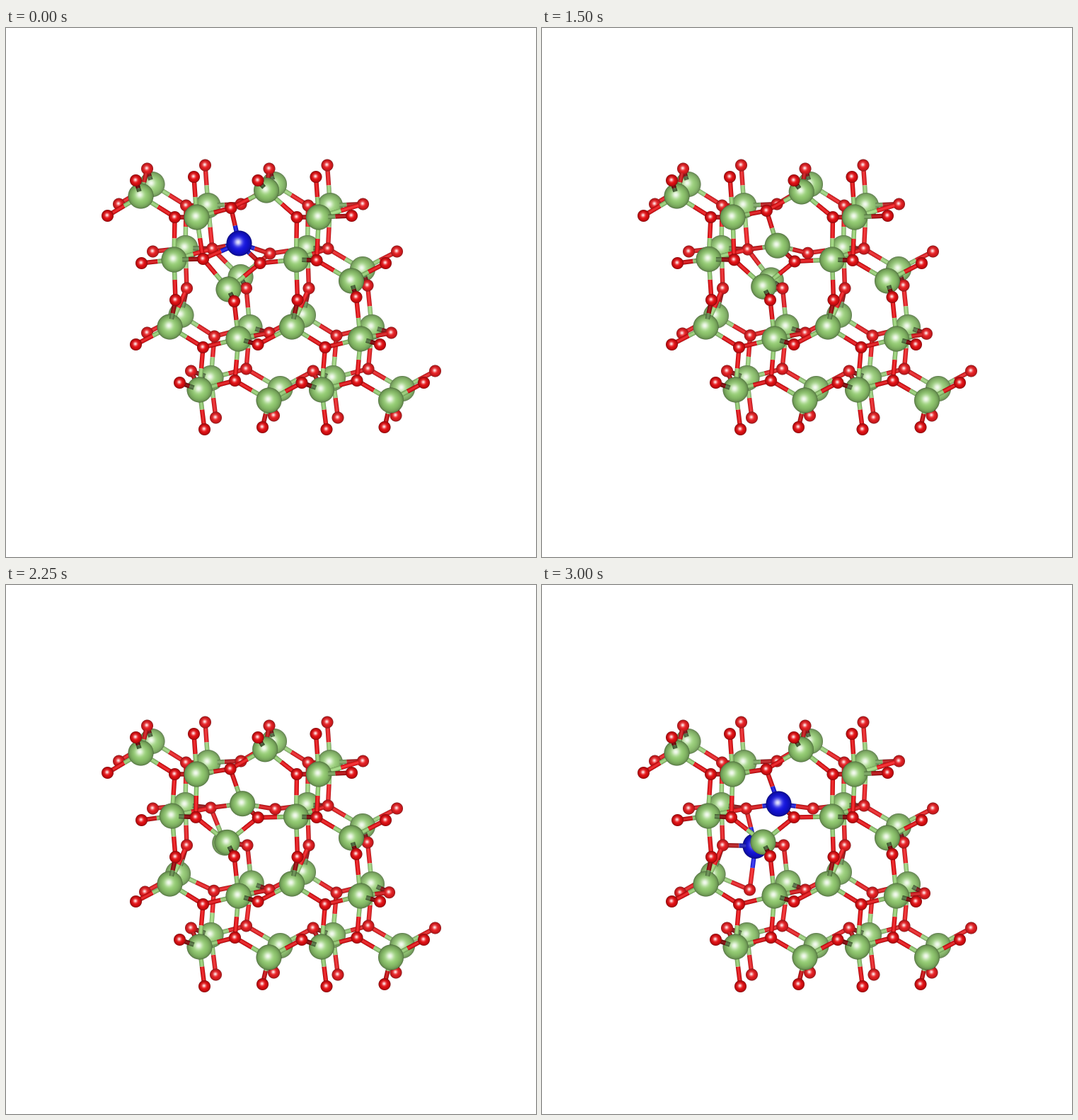
A matplotlib script for the animation above (4000 ms loop, 749 px wide and 748 px high).

```python
import numpy as np
import matplotlib.pyplot as plt
from matplotlib.animation import FuncAnimation

W, H, DPI = 749, 748, 100
STEP_MS, STEPS, LAST = 250, 16, 9     # LAST: index of the final pose
METAL_R, OXY_R, BOND_R = 18, 8.5, 3.2
REACH, CORE_REACH = 63, 58            # longest bond on screen
TILTED = 48                           # shorter ones lean to the viewer

GREEN = np.array([148, 206, 114]) / 255
RED = np.array([232, 14, 18]) / 255
BLUE = np.array([20, 20, 228]) / 255

# Unit cell: repeated along PERIOD, and once more behind by DEPTH.
PERIOD = np.array([172.5, 0])
DEPTH = np.array([16, -16.5])
METALS = dict(A=(190, 237), B=(269, 267), C=(237, 327), D=(315, 357),
              E=(231, 422), F=(328, 439), G=(273, 511), H=(371, 526))
OXYGENS = dict(a=(143, 265), b=(183, 215), c=(265, 210), d=(238, 267),
               e=(191, 332), f=(266, 328), g=(239, 384), h=(322, 380),
               i=(183, 447), j=(278, 451), k=(245, 501), l=(323, 498),
               m=(280, 567), n=(362, 564))
TRIPLE = "aeik"                       # sites that appear three times in a row
TOWARD = "abfghik"                    # oxygens in front of their metal
CORE = "X"

# Displacement around the defect: (start, end).
SHIFT = {CORE: ((0, 0), (5, 5)),
         "D0": ((-1, 12), (-3, 6)), "D0'": ((0, 11), (-30, 28)),
         "f0": ((12, -2), (1, 0)), "f0'": ((9, 0), (6, 4)),
         "e1": ((-5, 0), (-8, -4)), "e1'": ((-7, 3), (3, 0)),
         "A1": ((5, -8), (3, -5)), "a1": ((2, -11), (1, -5)),
         "h0": ((0, 6), (0, 3)), "h0'": ((1, 4), (3, 4)),
         "j0'": ((0, 1), (-1, -4)), "E0'": ((0, 0), (-6, 3)),
         "i0'": ((0, 0), (-4, 4)), "i2'": ((0, 0), (-4, 5)),
         "F0'": ((0, 0), (3, -2)), "C0": ((0, 0), (-3, -1))}

# Bonds that break or form by depth: first and last pose.
SPANS = {("F0'", "j0'"): (0, 7), ("G0'", "j0'"): (0, 7), ("D0'", "g0'"): (LAST, LAST)}


def build():
    rest = {CORE: np.array([329.0, 304.0])}
    for site, p in {**METALS, **OXYGENS}.items():
        for n in range(3 if site in TRIPLE else 2):
            rest[f"{site}{n}"] = p + n * PERIOD
            rest[f"{site}{n}'"] = p + n * PERIOD + DEPTH
    return rest


REST = build()


def is_far(key):
    return key.endswith("'")


def positions(pose):
    t = pose / LAST
    smooth, quick = t * t * (3 - 2 * t), 1 - (1 - t) ** 2.5
    pos = dict(REST)
    for k, (start, end) in SHIFT.items():
        ease = smooth if is_far(k) else quick
        pos[k] = REST[k] + np.array(start) * (1 - ease) + np.array(end) * ease
    return pos


def window(img, lo, hi, pad):
    x0, y0 = np.floor(lo - pad).astype(int)
    x1, y1 = np.ceil(hi + pad).astype(int) + 1
    yy, xx = np.mgrid[y0:y1, x0:x1]
    return img[y0:y1, x0:x1], xx, yy


def blend(view, color, alpha, fog):
    color = np.clip(color, 0, 1) * (1 - fog) + fog
    view += (color - view) * alpha[..., None]


def sphere(img, c, r, color, fog):
    view, xx, yy = window(img, c, c, r + 2)
    u, v = (xx - c[0]) / r, (yy - c[1]) / r
    d = np.hypot(u, v)
    nz = np.sqrt(np.clip(1 - d * d, 0, 1))
    glow = .88 * np.exp(-((u + .08) ** 2 + (v + .1) ** 2) / .1)
    lit = color * (.42 + .6 * nz ** .8)[..., None]
    lit = lit + (1 - lit) * glow[..., None]
    blend(view, lit, np.clip((1 - d) * r + .5, 0, 1), fog)


def rod(img, p, q, color, shade, fog):
    size = np.hypot(*(q - p))
    if size < .5:
        return
    dx, dy = (q - p) / size
    view, xx, yy = window(img, np.minimum(p, q), np.maximum(p, q), BOND_R + 2)
    x, y = xx - p[0], yy - p[1]
    t, s = x * dx + y * dy, np.abs(x * dy - y * dx)
    nz = np.sqrt(np.clip(1 - (s / BOND_R) ** 2, 0, 1))
    lit = color * (shade * (.6 + .45 * nz))[..., None]
    lit = lit + (1 - lit) * (.15 * shade * nz ** 6)[..., None]
    alpha = (np.clip(BOND_R + .5 - s, 0, 1) * np.clip(t + .5, 0, 1)
             * np.clip(size - t + .5, 0, 1))
    blend(view, lit, alpha, fog)


def bond(img, a, b, color, fog, near=False, trim=0):
    """Two-coloured rod; the shorter it looks, the darker its side."""
    length = np.hypot(*(b - a))
    flat = min(length / REACH, 1)
    shade = .3 + .7 * flat ** 1.5 if near else .55 + .45 * flat
    step, mid = (b - a) / length, (a + b) / 2
    start = a + step * min(METAL_R * flat, length / 2) if near else a
    rod(img, mid, b - step * trim, RED, shade, fog)
    rod(img, start, mid, color, shade, fog)


def linked(pos, m, o, pose):
    first, last = SPANS.get((m, o), (0, LAST))
    reach = CORE_REACH if m == CORE else REACH
    return first <= pose <= last and np.hypot(*(pos[m] - pos[o])) < reach


def layer_bonds(pos, pose, far):
    keys = [k for k in pos if is_far(k) == far]
    metals = [k for k in keys if k[0].isupper()]
    oxygens = [k for k in keys if k[0].islower()]
    pairs = [(m, o) for m in metals for o in oxygens if linked(pos, m, o, pose)]
    near = [(m, o) for m, o in pairs
            if o[0] in TOWARD and np.hypot(*(pos[m] - pos[o])) < TILTED]
    return metals, oxygens, pairs, near


def draw_layer(img, pos, pose, far, tint):
    fog = .06 if far else 0
    metals, oxygens, pairs, near = layer_bonds(pos, pose, far)

    def draw(front):
        for m, o in pairs:
            if ((m, o) in near) == front:
                bond(img, pos[m], pos[o], tint(m), fog, front)
        for o in oxygens:
            if (o[0] in TOWARD) == front:
                sphere(img, pos[o], OXY_R, RED, fog)

    draw(False)
    for m in metals:
        sphere(img, pos[m], METAL_R, tint(m), 0 if tint(m) is BLUE else fog)
    draw(True)
    return near


def render(pose):
    img = np.ones((H, W, 3))
    pos = positions(pose)
    blue = {0: {CORE}, LAST: {CORE, "D0'"}}.get(pose, set())

    def tint(k):
        return BLUE if k in blue else GREEN

    draw_layer(img, pos, pose, True, tint)
    # A metal that leans to one oxygen also holds that oxygen's far twin.
    near = layer_bonds(pos, pose, False)[3]
    across = [(m, o + "'") for m, o in near if m != CORE]
    for m, o in across + [(CORE, "f0'"), (CORE, "e1'")]:
        bond(img, pos[m], pos[o], tint(m), .03, trim=OXY_R - 2)
    draw_layer(img, pos, pose, False, tint)
    return img


fig = plt.figure(figsize=(W / DPI, H / DPI), dpi=DPI, facecolor="white")
ax = fig.add_axes([0, 0, 1, 1])
ax.axis("off")
picture = ax.imshow(render(0), interpolation="nearest", aspect="auto")


def update(i):
    picture.set_data(render(min(max(i - 3, 0), LAST)))
    return [picture]


anim = FuncAnimation(fig, update, frames=STEPS, interval=STEP_MS,
                     repeat=True, repeat_delay=0)
plt.show()
```
